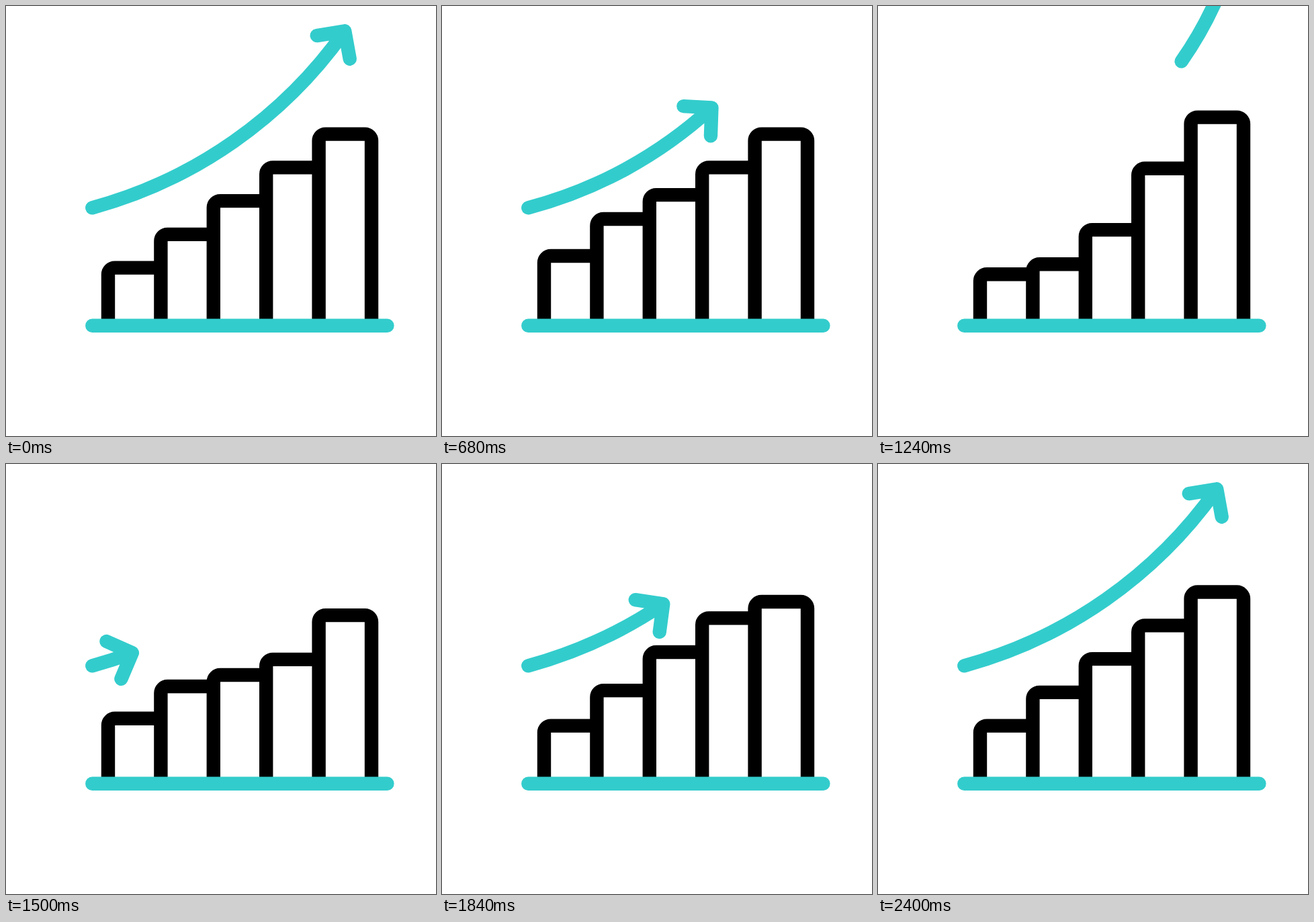
An HTML page that plays this animation: 640x640 px, repeating every 3000 ms.

```html
<!DOCTYPE html>
<html lang="en">
<head>
<meta charset="utf-8">
<title>Growth chart</title>
<style>
  html, body { margin: 0; width: 100%; height: 100%; overflow: hidden; background: #fff; }
  svg { display: block; width: 100%; height: 100%; }
  path { fill: none; stroke-width: 20.4; }
  #bars path { stroke: #000; }
  .teal { stroke: #33cccc; stroke-linecap: round; stroke-linejoin: round; }
</style>
</head>
<body>
<svg viewBox="0 0 640 640">
  <g id="bars"><path/><path/><path/><path/><path/></g>
  <path class="teal" d="M128.3 475.7H567.4"/>
  <path class="teal" id="arrow"/>
</svg>
<script>
const LOOP = 3000, STEP = 20;
const BASE = 475.7, LEFT = 152, PITCH = 78.4, CORNER = 10;
const bars = [...document.querySelectorAll('#bars path')];
const arrow = document.getElementById('arrow');

const smooth = u => u * u * (3 - 2 * u);
const linear = u => u;
const rad = deg => deg * Math.PI / 180;

// Value at time t of a track of [time, value] keys.
function track(t, keys, ease = linear) {
  if (t <= keys[0][0]) return keys[0][1];
  for (let i = 1; i < keys.length; i++) {
    const [t0, v0] = keys[i - 1], [t1, v1] = keys[i];
    if (t < t1) return v0 + (v1 - v0) * ease((t - t0) / (t1 - t0));
  }
  return keys[keys.length - 1][1];
}

const BOUNCE = [[0, 0], [400, 25.5], [800, -51], [1200, 12.8], [1600, 0]];
const BAR_START = [200, 360, 520, 680, 820];

function drawBar(bar, i, t) {
  const x = LEFT + PITCH * i, right = x + PITCH, r = CORNER;
  const y = 389.6 - 49.75 * i - track(t - BAR_START[i], BOUNCE, smooth);
  const end = i === bars.length - 1
    ? `H${right - r}A${r} ${r} 0 0 1 ${right} ${y + r}V${BASE}`
    : `H${right}`;
  bar.setAttribute('d', `M${x} ${BASE}V${y + r}A${r} ${r} 0 0 1 ${x + r} ${y}${end}`);
}

const ENTER = 1400, LAUNCH = 750, FULL = 468;
const RADIUS = [[520, 678], [920, 603], [1240, 544.5], [1320, 530]];
const START_ANGLE = [[520, 15.2], [920, 14], [1240, 13]];
const PULL_BACK = [[200, FULL], [LAUNCH, 307]];
const GROW = [[ENTER, 23], [1500, 62.6], [1840, 222], [2360, 452], [2400, FULL]];

// Tail and tip are distances along a circular arc; the head follows its tangent.
function drawArrow(t) {
  let r = 678, a0 = rad(15.2), tail = 0, tip, lean = 0;
  if (t < ENTER) {
    r = track(t, RADIUS);
    a0 = rad(track(t, START_ANGLE));
    tail = 48 * (Math.max(0, t - LAUNCH) / 170) ** 2;
    tip = track(t, PULL_BACK, smooth) + tail;
  } else {
    tip = track(t, GROW);
    lean = rad(3) * Math.sin(Math.PI * Math.min(1, (t - ENTER) / 1000));
  }
  const at = s => {
    const a = a0 + s / r;
    return [128.3 + r * (Math.sin(a) - Math.sin(a0)), 300.3 + r * (Math.cos(a) - Math.cos(a0))];
  };
  const [x, y] = at(tip);
  const barb = side => {
    const a = a0 + tip / r + lean + Math.PI + side * rad(45.5);
    return [x + 42 * Math.cos(a), y - 42 * Math.sin(a)];
  };
  arrow.setAttribute('d',
    `M${at(tail)}A${r} ${r} 0 0 0 ${x} ${y}M${barb(-1)}L${x} ${y}L${barb(1)}`);
}

function frame(now) {
  const t = Math.floor(now % LOOP / STEP) * STEP;
  bars.forEach((bar, i) => drawBar(bar, i, t));
  drawArrow(t);
  requestAnimationFrame(frame);
}
frame(0);
</script>
</body>
</html>
```
